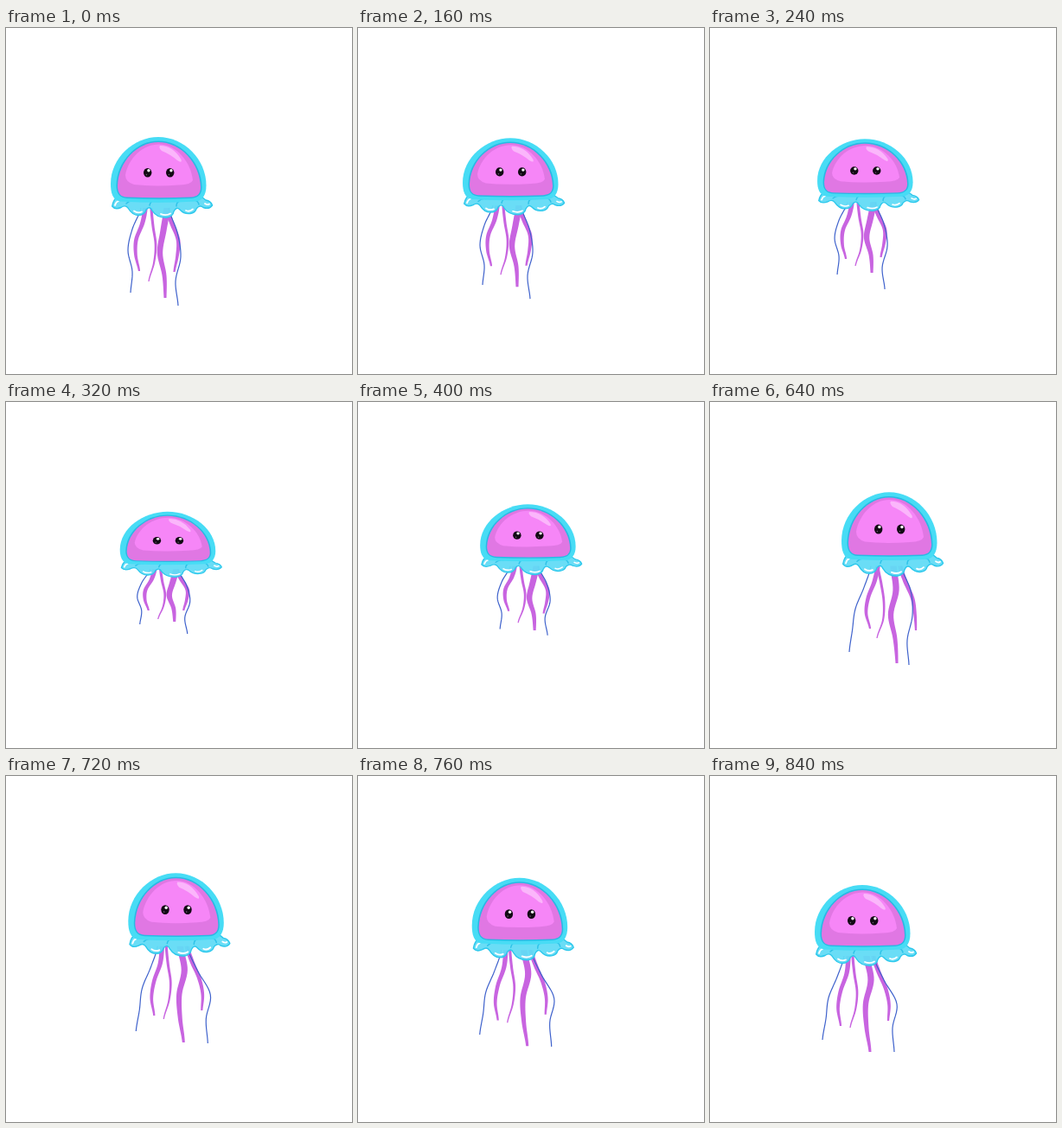
These frames come from a looping animation (400x400 px, 880 ms). An HTML page:

```html
<!DOCTYPE html>
<html lang="en">
<head>
<meta charset="utf-8">
<title>Jellyfish</title>
<style>
  html, body { margin: 0; width: 100%; height: 100%; overflow: hidden; background: #fff; }
  svg { display: block; width: 100%; height: 100%; }
</style>
</head>
<body>
<svg viewBox="0 0 400 400">
  <g id="arms"></g>
  <g id="body">
    <path fill="#62dcf6" fill-opacity=".95" stroke="#2cc8ec" stroke-width="1.4" stroke-linejoin="round"
      d="M130 194Q124 198 122.700 206Q126 210.500 133 207.500Q138 204 141 208Q146 216.500 153 216.500Q160 216.500 162 210Q166 205 169 211Q174 219.300 185 219.300Q193 218.500 194 212Q197 206 201 210Q206 215.500 213 214.500Q219 213.500 220 209Q224 204 228 207.500Q235 210 238.500 205Q237 200 231 199L222 192Z"/>
    <g fill="none" stroke="#2fc3e9" stroke-width="1.500" stroke-linecap="round">
      <path d="M139 203Q143 199 148 200M166 205Q167 200 171 200M197 206Q197 201 201 200M223 204Q222 200 218 199"/>
    </g>
    <g fill="none" stroke="#fff" stroke-width="1.800" stroke-linecap="round">
      <path d="M126 205Q127 201 130 200M148 211.500Q152 214.500 157 212.500M179 215Q185 217.500 190 214.500M208 211Q212 213 216 209.500M230 203Q233 205 235 203.500"/>
    </g>
    <path fill="#47dcf5"
      d="M121 180C121 150 148 126 176 126C206 126 231.500 152 231.500 182C231.500 193 227 200 219 200.500Q177 203 132 200.500C123 199 121 190 121 180Z"/>
    <path fill="#e077e3" stroke="#28b9e4" stroke-width="3" paint-order="stroke"
      d="M129 182C130 154 152 132 176 132C202 132 224 156 225 184C225 192 221 195 214 195.500Q177 197 140 195.500C132 195 129 191 129 182Z"/>
    <path fill="#f686f7"
      d="M138 170C142 150 158 134.500 177 134.500C197 134.500 214 155 216 176Q214 181 200 181.500Q170 183.500 148 181Q138 178 138 170Z"/>
    <path fill="#fbb6fb"
      d="M178 136Q193 136 202.500 152Q204 157 198 153Q190 146 180 142Q176 138 178 136Z"/>
    <g id="eyes"></g>
  </g>
</svg>
<script>
const LOOP = 880, STEP = 40;
const TIMES = [40, 240, 320, 480, 640, 720, 840];
const FLOOR = [220, 212, 203, 199, 202, 209, 220];
const SQUASH = [1, .89, .81, .96, 1.04, 1.03, 1];

// x at five even places from root to tip, for three poses; tip heights over time
const ARMS = [
  { w: 5.5, rest: [161, 157.5, 150.5, 150, 154], mid: [163, 159, 152, 149.5, 154],
    far: [160, 158, 151, 148, 151], tip: [281, 267, 241, 244, 262, 277, 289] },
  { w: 3.2, rest: [168, 170, 173, 171, 165], mid: [163, 167, 170, 169, 162],
    far: [165, 167, 170, 168, 162], tip: [293, 275, 251, 262, 273, 281, 291] },
  { w: 7.5, rest: [186, 182, 178, 183, 184], mid: [181, 184, 178, 183, 185],
    far: [181, 186, 180, 181, 185], tip: [312, 283, 254, 280, 302, 308, 319] },
  { w: 5.5, rest: [186, 192, 199, 198, 194.5], mid: [189, 195, 203, 206, 207],
    far: [189, 195, 203, 207, 206], tip: [282, 265, 241, 251, 264, 271, 283] },
  { w: 0, rest: [156, 146, 141, 146, 144], mid: [155, 147, 137, 133.5, 130],
    far: [155, 147, 137, 134, 130], tip: [306, 285, 257, 272, 289, 295, 305] },
  { w: 0, rest: [188, 198, 202, 196, 199], mid: [190, 201, 203, 197, 199],
    far: [189, 201, 216, 211, 213], tip: [321, 302, 268, 274, 304, 309, 319] }
];

const NS = "http://www.w3.org/2000/svg";
const body = document.getElementById("body");

function add(parent, tag, attrs) {
  const el = document.createElementNS(NS, tag);
  for (const k in attrs) el.setAttribute(k, attrs[k]);
  return document.getElementById(parent).appendChild(el);
}

for (const x of [163.7, 189.7]) {
  add("eyes", "ellipse", { cx: x, cy: 167.2, rx: 4.7, ry: 5.3, fill: "#120a14" });
  add("eyes", "circle", { cx: x + 1.2, cy: 164.8, r: 1.7, fill: "#fff" });
  add("eyes", "circle", { cx: x - 1.3, cy: 169.6, r: .8, fill: "#6b5a70" });
}

for (const arm of ARMS) {
  arm.el = add("arms", "path", arm.w
    ? { fill: "#c864e0" }
    : { fill: "none", stroke: "#3f62cc", "stroke-width": 1.2 });
}

const clamp = v => Math.min(1, Math.max(0, v));
const mix = (a, b, k) => a + (b - a) * k;
const ease = (t, from, to) => (1 - Math.cos(Math.PI * clamp((t - from) / (to - from)))) / 2;

function hermite(a, b, ma, mb, u) {
  const v = 1 - u;
  return a * v * v * (1 + 2 * u) + b * u * u * (3 - 2 * u) + ma * u * v * v - mb * u * u * v;
}

// Smooth track through the key values, flat at each turning point
function track(vals, t) {
  const last = TIMES.length - 1;
  if (t <= TIMES[0]) return vals[0];
  if (t >= TIMES[last]) return vals[last];
  let i = 0;
  while (t >= TIMES[i + 1]) i++;
  const rate = j => (vals[j + 1] - vals[j]) / (TIMES[j + 1] - TIMES[j]);
  const slope = j => {
    if (j === 0 || j === last) return 0;
    const a = rate(j - 1), b = rate(j);
    return a * b <= 0 ? 0 : 2 * a * b / (a + b);
  };
  const span = TIMES[i + 1] - TIMES[i];
  return hermite(vals[i], vals[i + 1], slope(i) * span, slope(i + 1) * span, (t - TIMES[i]) / span);
}

function curveX(xs, u) {
  const n = xs.length - 1, i = Math.min(n - 1, Math.floor(u * n));
  const tan = j => (xs[Math.min(n, j + 1)] - xs[Math.max(0, j - 1)]) / 2;
  return hermite(xs[i], xs[i + 1], tan(i), tan(i + 1), u * n - i);
}

function armPath(arm, t, dx, root) {
  const toMid = ease(t, 480, 640), toFar = ease(t, 640, 720);
  const xs = arm.rest.map((x, i) => dx + mix(mix(x, arm.mid[i], toMid), arm.far[i], toFar));
  const tip = track(arm.tip, t), left = [], right = [];
  for (let i = 0; i <= 32; i++) {
    const u = i / 32, x = curveX(xs, u), y = mix(root, tip, u).toFixed(2);
    const half = arm.w * (1 - .6 * u * u) / 2;
    left.push((x - half).toFixed(2) + " " + y);
    right.unshift((x + half).toFixed(2) + " " + y);
  }
  return arm.w ? "M" + left.concat(right).join("L") + "Z" : "M" + left.join("L");
}

function draw(t) {
  const dx = 31 * (ease(t, 157, 564) - ease(t, 640, 840));
  const floor = track(FLOOR, t), squash = track(SQUASH, t);
  body.setAttribute("transform", `translate(${dx} ${floor}) scale(1 ${squash}) translate(0 -220)`);
  for (const arm of ARMS) arm.el.setAttribute("d", armPath(arm, t, dx, floor - 12 * squash));
}

const start = performance.now();
function tick() {
  const t = (performance.now() - start) % LOOP;
  draw(Math.floor(t / STEP) * STEP);
  requestAnimationFrame(tick);
}
tick();
</script>
</body>
</html>
```
